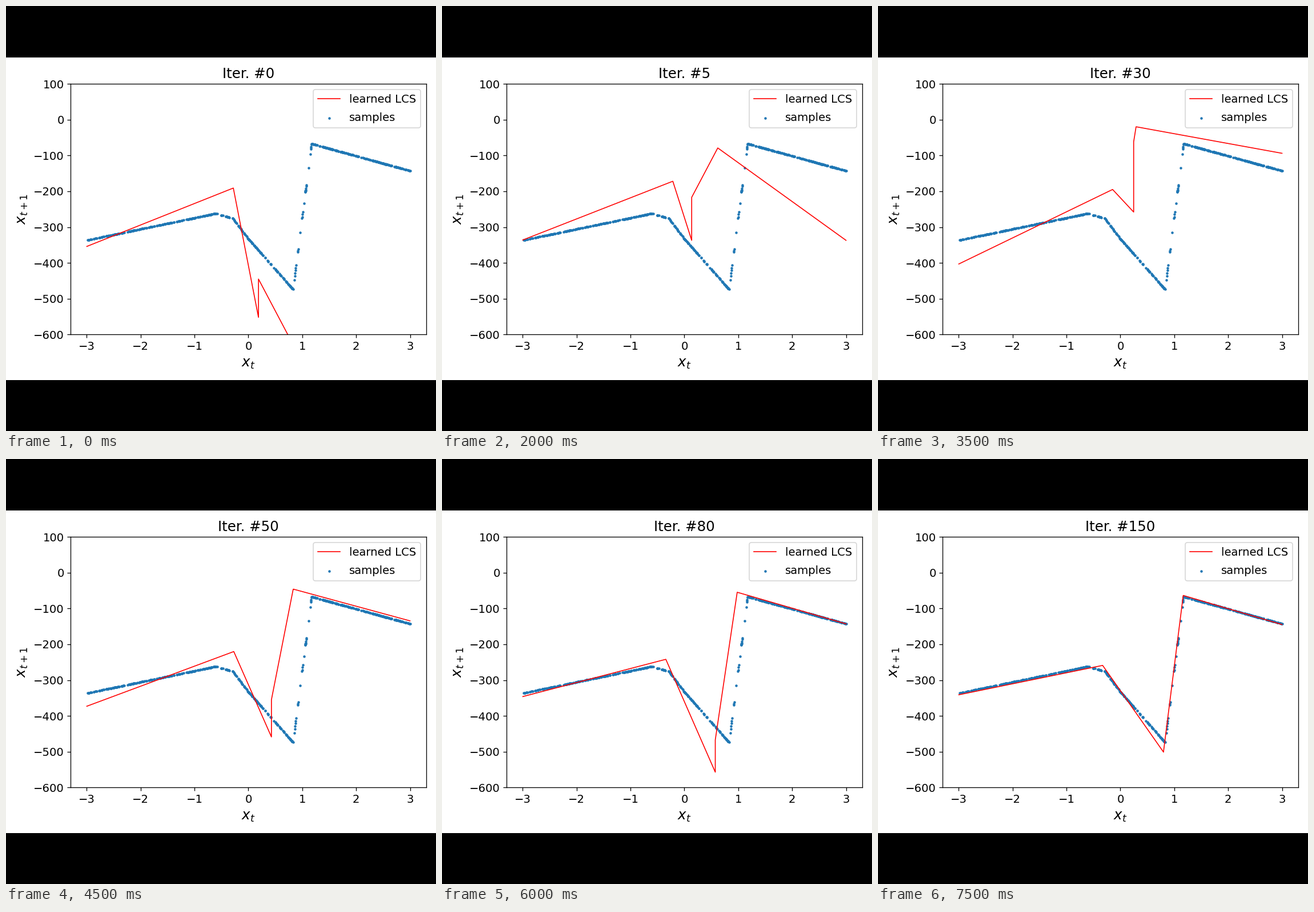
These frames come from a looping animation (753x743 px, 8000 ms). A matplotlib script:

```python
import numpy as np
import matplotlib.pyplot as plt
from matplotlib.animation import FuncAnimation
from matplotlib.patches import Rectangle

W, H, DPI = 753, 743, 128
K = W / 6.4 / DPI  # a 6.4 x 4.8 inch figure fitted to the stage width

plt.rcParams.update({
    "font.family": "DejaVu Sans",
    "font.size": 12 * K,
    "axes.titlesize": 15 * K,
    "axes.labelsize": 15 * K,
    "axes.linewidth": 0.8 * K,
    "axes.titlepad": 6 * K,
    "axes.labelpad": 4 * K,
    "patch.linewidth": K,
})
for axis in ("xtick", "ytick"):
    plt.rcParams.update({
        f"{axis}.labelsize": 12 * K,
        f"{axis}.major.size": 3.5 * K,
        f"{axis}.major.pad": 3.5 * K,
        f"{axis}.major.width": 0.8 * K,
    })

ITERS = [0, 1, 2, 3, *range(5, 11, 5), *range(20, 81, 10), 100, 120, 150]

# Turning points of the training: step -> left end, crest (x, y), dip (x, y),
# level after the jump, slope after the jump, right end
POSES = {
    0: (-354, -0.28, -191, 0.187, -552, -445, -285, -495),
    4: (-336, -0.215, -172, 0.135, -337, -217, 285, -337),
    7: (-403, -0.145, -195, 0.246, -258, -62, 955, -94),
    10: (-358, -0.335, -233, 0.518, -559, -501, 667, -155),
    12: (-346, -0.345, -242, 0.573, -557, -467, 1013, -143),
    15: (-341, -0.33, -259, 0.80, -501, -500, 1195, -145),
}
CAP_AT_ZERO = -12  # the falling right-hand line always aims at this height


def learned(step):
    start, cx, cy, dx, dy, level, slope, end = (
        np.interp(step, list(POSES), p) for p in zip(*POSES.values()))
    x = np.linspace(dx, 3, 800)
    cap = CAP_AT_ZERO + (end - CAP_AT_ZERO) * x / 3
    y = np.minimum(level + slope * (x - dx), cap)
    return np.r_[-3, cx, dx, x], np.r_[start, cy, dy, y]


def make_samples(n=550):
    kx = [-2.985, -0.6, -0.29, 0, 0.83, 1.17, 3]
    ky = [-336, -262, -276, -333, -474, -67, -143]
    x = np.random.default_rng(4).uniform(kx[0], kx[-1], n)
    x = np.append(x, kx)
    return x, np.interp(x, kx, ky)


fig = plt.figure(figsize=(W / DPI, H / DPI), dpi=DPI, facecolor="black")
fig.add_artist(Rectangle((0, 89 / H), 1, 564 / H, fc="white", ec="none",
                         lw=0, zorder=-1))

left, right, top, bottom = 113.2, 735.8, 136, 574.4
ax = fig.add_axes([left / W, 1 - bottom / H,
                   (right - left) / W, (bottom - top) / H])
line, = ax.plot([], [], color="red", lw=K, label="learned LCS")
ax.scatter(*make_samples(), s=3 * K * K, color="tab:blue", label="samples")
ax.set(xlim=(-3.3, 3.3), ylim=(-600, 100))
ax.set_xlabel("$x_t$", labelpad=5 * K)
ax.set_ylabel("$x_{t+1}$")
ax.set_xticks(range(-3, 4))
ax.set_yticks(range(-600, 101, 100))
ax.legend(loc="upper right", labelspacing=0.68)
title = ax.set_title("Iter. #0")


def update(step):
    line.set_data(*learned(step))
    title.set_text(f"Iter. #{ITERS[step]}")
    return line, title


anim = FuncAnimation(fig, update, frames=len(ITERS), interval=500,
                     repeat=True, repeat_delay=0)
plt.show()
```
